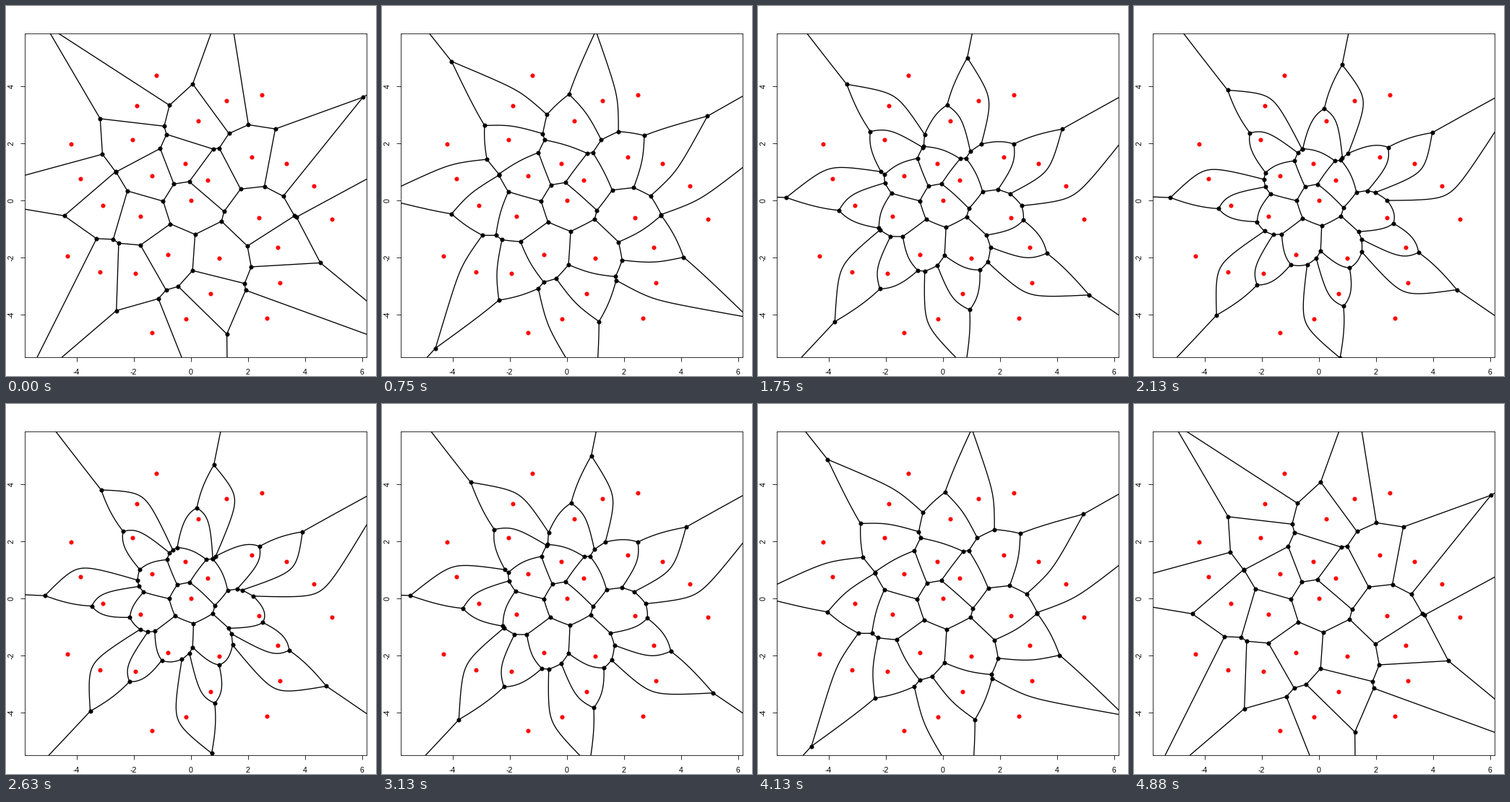
Recreate the animation shown at these times as a matplotlib script. Size 512 by 512 pixels, loop 5000 ms.

```python
import numpy as np
import matplotlib.pyplot as plt
from matplotlib.animation import FuncAnimation

plt.rcParams["font.family"] = "Liberation Sans"
plt.rcParams["font.size"] = 12

SIZE, DPI = 512, 64
STEPS = 20                  # weight steps up, then the same steps back
MAX_WEIGHT = 3
SCALE, X0, Y0 = 39.5, 255.6, 268.95     # pixels per unit, origin in pixels
LEFT, RIGHT, TOP, BOTTOM = 25.6, 499.2, 38.4, 486.4

# Sites on a Fermat spiral
theta = np.linspace(0, 25, 30)
sites = np.sqrt(theta)[:, None] * np.column_stack([np.cos(theta), np.sin(theta)])

RAYS = 1440
phi = np.linspace(0, 2 * np.pi, RAYS, endpoint=False) + 0.001
rays = np.column_stack([np.cos(phi), np.sin(phi)])
GAP = np.full((1, 2), np.nan)


def cell(i, w):
    """Edges and corners of cell i shared only with higher-numbered cells."""
    d = sites - sites[i]
    dw = w - w[i]
    s = (d ** 2).sum(axis=1) - dw ** 2
    s[i] = 1
    # Inverse distance to each bisector; column i stays 0, meaning unbounded
    inv = 2 * (rays @ d.T + dw) / s
    near = inv.argmax(axis=1)
    reach = np.maximum(inv.max(axis=1), 1e-3)
    rim = sites[i] + rays / reach[:, None]

    turns = np.flatnonzero(near != np.roll(near, -1))
    corners = []
    for m in turns:
        n = (m + 1) % RAYS
        a, b = near[m], near[n]
        da, db = inv[m, a] - inv[m, b], inv[n, a] - inv[n, b]
        t = da / (da - db)
        u = (1 - t) * rays[m] + t * rays[n]
        g = (1 - t) * inv[m, a] + t * inv[n, a]
        corners.append(sites[i] + u / max(g, 1e-3))

    edges, nodes = [], []
    for k, m in enumerate(turns):
        k2 = (k + 1) % len(turns)
        j = near[(m + 1) % RAYS]
        if j > i:
            span = (turns[k2] - m) % RAYS
            run = (m + 1 + np.arange(span)) % RAYS
            edges += [corners[k][None], rim[run], corners[k2][None], GAP]
            if near[m] > i:
                nodes.append(corners[k])
    return edges, nodes


def diagram(w):
    edges, nodes = [GAP], []
    for i in range(len(sites)):
        e, n = cell(i, w)
        edges += e
        nodes += n
    return np.concatenate(edges), np.array(nodes)


fig = plt.figure(figsize=(SIZE / DPI, SIZE / DPI), dpi=DPI, facecolor="white")
ax = fig.add_axes([LEFT / SIZE, 1 - BOTTOM / SIZE,
                   (RIGHT - LEFT) / SIZE, (BOTTOM - TOP) / SIZE])
ax.set_xlim((LEFT - X0) / SCALE, (RIGHT - X0) / SCALE)
ax.set_ylim((Y0 - BOTTOM) / SCALE, (Y0 - TOP) / SCALE)

xt, yt = range(-4, 7, 2), range(-4, 5, 2)
ax.set_xticks(xt, [str(v) for v in xt])
ax.set_yticks(yt, [str(v) for v in yt], rotation=90, va="center")
ax.tick_params(length=7.2, width=0.9)
ax.tick_params(axis="x", pad=10.8)
ax.tick_params(axis="y", pad=7.2)
for spine in ax.spines.values():
    spine.set_linewidth(0.9)

dot = dict(ls="none", marker="o", ms=6, mew=0.75)
lines, = ax.plot([], [], "k-", lw=1.5, solid_joinstyle="round")
nodes, = ax.plot([], [], color="black", **dot)
ax.plot(*sites.T, color="red", **dot)


def update(frame):
    step = min(frame, 2 * STEPS - 1 - frame)
    w = np.linspace(0, MAX_WEIGHT * step / (STEPS - 1), len(sites))
    edge_pts, node_pts = diagram(w)
    lines.set_data(*edge_pts.T)
    nodes.set_data(*node_pts.T)
    return lines, nodes


anim = FuncAnimation(fig, update, frames=2 * STEPS, interval=125,
                     repeat=True, repeat_delay=0)
plt.show()
```
